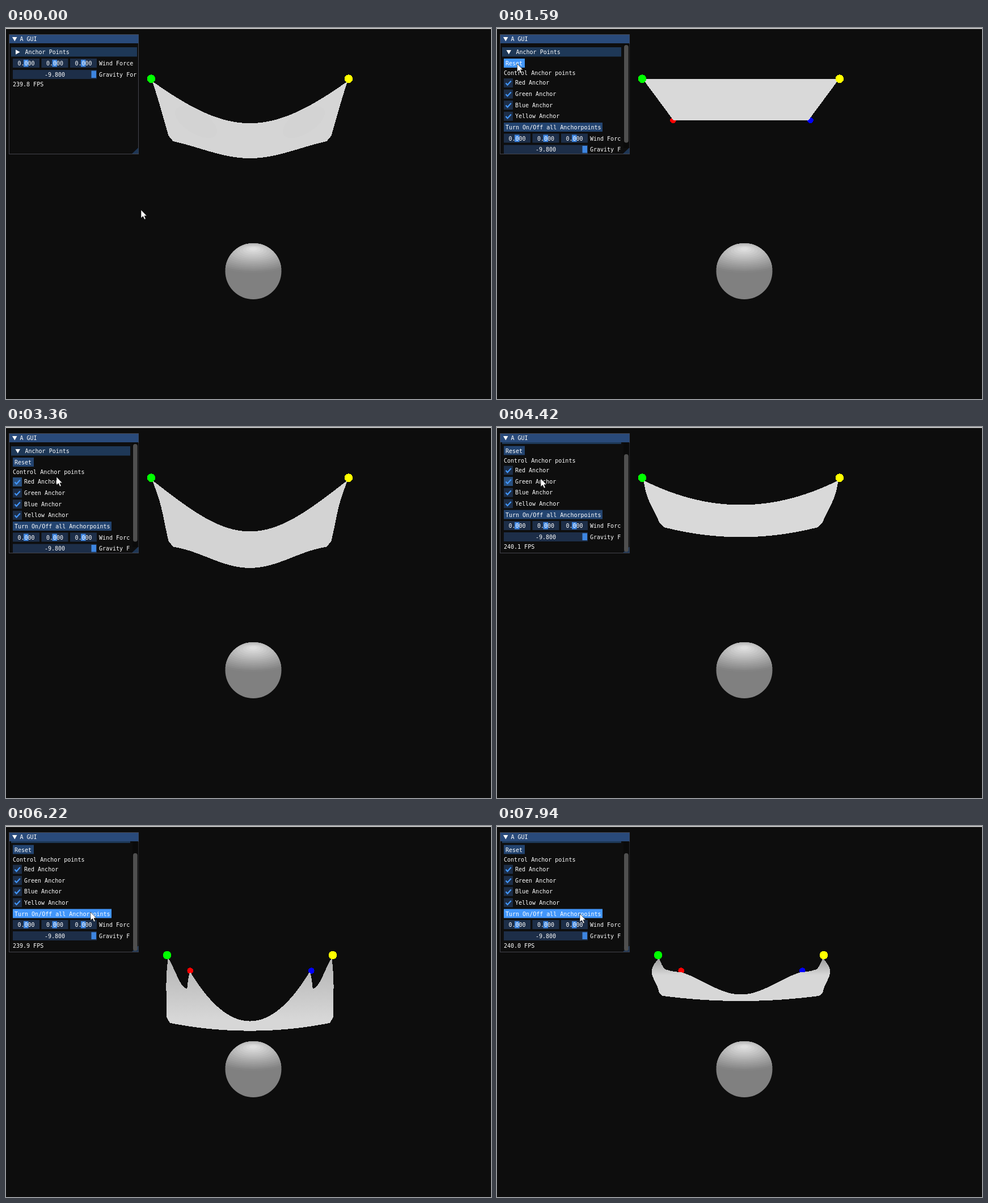
Write an HTML page that moves like this. It is 855 px wide and 655 px high and loops after 7.99 s.

```html
<!DOCTYPE html>
<html lang="en">
<head>
<meta charset="utf-8">
<title>Cloth</title>
<style>
  html, body { margin: 0; width: 100%; height: 100%; overflow: hidden; background: #0d0d0d; }
  svg { display: block; width: 855px; height: 655px; }
  text { font: 10px "DejaVu Sans Mono", "Liberation Mono", monospace; fill: #fff; white-space: pre; }
  .mid { text-anchor: middle; }
  .crisp { shape-rendering: crispEdges; }
  .frame { fill: #1d2e48; }
  .frame.hot { fill: #29507f; }
  .button { fill: #234470; }
  .button.hot { fill: #4296fa; }
  .header { fill: #1e3857; }
  .header.hot { fill: #387bcb; }
  .grab { fill: #3d85e0; }
  .tick { fill: none; stroke: #4296fa; stroke-width: 2.2; }
</style>
</head>
<body>
<svg viewBox="0 0 855 655">
  <defs>
    <linearGradient id="shade" gradientUnits="userSpaceOnUse" x1="0" x2="0">
      <stop id="shadeTop"/><stop id="shadeBase" offset="1"/>
    </linearGradient>
    <clipPath id="clothClip"><path id="clipShape"/></clipPath>
    <clipPath id="ballClip"><circle cx="436" cy="429.5" r="49.5"/></clipPath>
    <clipPath id="panelClip"><rect id="panelArea" x="9" y="27" height="195"/></clipPath>
  </defs>
  <rect width="855" height="655" fill="#0d0d0d"/>
  <rect width="855" height="1.5" fill="#f0f0f0"/>

  <g id="ball" clip-path="url(#ballClip)"><rect x="386" y="379" width="100" height="101" fill="#808080"/></g>
  <g class="crisp">
    <circle id="red" r="5.3" fill="#f00"/>
    <circle id="blue" r="5.3" fill="#00f"/>
    <path id="cloth" fill="url(#shade)"/>
  </g>
  <g clip-path="url(#clothClip)">
    <ellipse class="patch" rx="42" ry="20"/>
    <ellipse class="patch" rx="42" ry="20"/>
  </g>
  <g class="crisp">
    <circle id="green" r="7.3" fill="#0f0"/>
    <circle id="yellow" r="7.3" fill="#ff0"/>
  </g>

  <rect x="5.5" y="11.5" width="228" height="211" fill="#0e0e0e" stroke="#44444c"/>
  <rect x="6" y="12" width="227.5" height="15" fill="#294a7a"/>
  <path d="M11 16h8.5l-4.2 7.5z" fill="#fff"/>
  <text x="24.5" y="23.3">A GUI</text>
  <path d="M222 222L233.5 211V222Z" fill="#1e3655"/>

  <g clip-path="url(#panelClip)">
    <g id="content">
      <rect id="header" class="header" x="9" y="34" height="16.5"/>
      <path id="arrow" fill="#fff"/>
      <text x="33.5" y="46.3">Anchor Points</text>
      <g id="anchorMenu">
        <rect id="reset" class="button" x="12" y="54" width="37" height="16"/>
        <text x="15" y="66">Reset</text>
        <text x="12" y="83">Control Anchor points</text>
        <g id="checks"></g>
        <rect id="toggle" class="button" x="12" y="167" width="174" height="16"/>
        <text x="15" y="179">Turn On/Off all Anchorpoints</text>
      </g>
      <g id="tail">
        <g id="drags"></g>
        <text x="164" y="66">Wind Force</text>
        <rect class="frame" x="12" y="74" width="148" height="16"/>
        <rect class="grab" x="150.5" y="75.5" width="8.5" height="12.5"/>
        <text class="mid" x="86" y="85.5">-9.800</text>
        <text x="164" y="85.5">Gravity Force</text>
        <text id="fps" x="12" y="103"></text>
      </g>
    </g>
  </g>
  <g id="scrollbar">
    <rect x="223" y="28" width="10.5" height="184" fill="#0a0a0a"/>
    <rect id="thumb" x="224" width="7.7" height="172.5" rx="3.8" fill="#4f4f4f"/>
  </g>
  <path id="cursor" d="M0 0V14.5L3.5 11.5L6 17L8.3 16L6 10.7H10.3Z" fill="#fff" stroke="#000" stroke-width=".6"/>
</svg>
<script>
const LOOP = 7990, OPEN = 950, RESET = 1575, PEAK = 2883, SCROLL = 4250, RELEASE = 4940, CATCH = 5730;
const MIDDLE = 430;
const $ = id => document.getElementById(id);
const set = (el, attrs) => { for (const k in attrs) el.setAttribute(k, attrs[k]); return el; };
const add = (parent, tag, attrs, text = '') => {
  const el = set(document.createElementNS('http://www.w3.org/2000/svg', tag), attrs);
  el.textContent = text;
  return parent.appendChild(el);
};
const clamp = (v, lo = 0, hi = 1) => Math.max(lo, Math.min(hi, v));
const lerp = (a, b, k) => a + (b - a) * k;
const smooth = u => { u = clamp(u); return u * u * (3 - 2 * u); };
const span = (t, from, to) => clamp((t - from) / (to - from));
const grey = v => { const g = Math.round(v); return `rgb(${g},${g},${g})`; };

// Static parts
for (let i = 0; i < 14; i++) {
  const k = i / 13;
  add($('ball'), 'ellipse', { cx: 436, cy: 402 - 12 * k, rx: 80 - 73 * k, ry: 30 - 27 * k, fill: grey(131 + 92 * k) });
}
for (let i = 0; i < 3; i++) {
  const x = 12 + i * 50.5;
  add($('drags'), 'rect', { class: 'frame', x, y: 54, width: 47, height: 16 });
  add($('drags'), 'rect', { class: 'grab', x: x + 19, y: 56, width: 8.5, height: 12.5 });
  add($('drags'), 'text', { class: 'mid', x: x + 23.5, y: 66 }, '0.000');
}
const checks = ['Red', 'Green', 'Blue', 'Yellow'].map((name, i) => {
  const y = 89 + i * 19.6;
  const box = add($('checks'), 'rect', { class: 'frame', x: 12, y, width: 16, height: 16 });
  const tick = add($('checks'), 'path', { class: 'tick', d: `M15.5 ${y + 8.3}l3 3.3l6.3-7` });
  add($('checks'), 'text', { x: 32, y: y + 11.4 }, name + ' Anchor');
  return { box, tick, y };
});

// An edge that bends from a parabola (wave 0) to a cosine (wave 1)
function edge([x0, y0], [x1, y1], count, wave, start = 0) {
  return Array.from({ length: count }, (_, i) => {
    const u = lerp(start, 1, i / count);
    const bend = lerp(u * (2 - u), (1 - Math.cos(Math.PI * u)) / 2, wave);
    return [lerp(x0, x1, u), lerp(y0, y1, bend)];
  });
}

// Left half of the cloth, from the middle of the top round to the middle of the hem
function outline({ tip, mid, corner, low, bulge = 0, wave = 0, hem = 0, round = .08, notch, pin, notchWave }) {
  const top = notch
    ? [...edge(tip, notch, 8, notchWave), ...edge(notch, pin, 4, 0), ...edge(pin, [MIDDLE, mid], 20, wave)]
    : edge(tip, [MIDDLE, mid], 32, wave);
  const side = Array.from({ length: 14 }, (_, i) => {
    const v = (i + 1) / 14 * (1 - round);
    const swell = bulge * Math.sin(Math.PI * v ** .7) ** 2;
    return [lerp(tip[0], corner[0], v) + swell, lerp(tip[1], corner[1], v)];
  });
  return [[MIDDLE, mid], ...top.reverse(), ...side, ...edge(corner, [MIDDLE, low], 20, hem, round / 2), [MIDDLE, low]];
}
const blend = (a, b, k) => a.map((p, i) => [lerp(p[0], b[i][0], k), lerp(p[1], b[i][1], k)]);

const flat = outline({ tip: [257, 90], mid: 90, corner: [311, 163], low: 163, round: 0 });

// Hanging from two corners; the height of the hem decides everything else
function hang(low) {
  const k = (low - 195) / 54;
  return outline({
    tip: [258, 94], mid: 138 + 46.5 * k, corner: [289, 176 + 35 * k], low,
    bulge: clamp(7 * k - 4, -4, 3), wave: clamp(.25 * k), hem: clamp(.8 * k)
  });
}

function hemHeight(t) {
  if (t < RESET) return 230 - 8 * Math.sin(Math.PI * t / 1300);
  if (t < PEAK) return 163 + 123 * smooth(span(t, 1600, PEAK) ** 1.7);
  const s = (t - PEAK) / 1000;
  return 228 + 58 * Math.exp(-.24 * s) * Math.cos(2 * Math.PI * s / 2.6);
}

function anchors(t) {
  const v = span(t, RELEASE, CATCH);
  return {
    outer: [256 + 28 * smooth(2 * v), 89.7 + 138.3 * v ** 1.7],
    inner: [lerp(310.5, 324.7, v), lerp(163, 255.5, v)]
  };
}
const tipAt = t => { const [x, y] = anchors(t).outer; return [x + 1.5, y + 4]; };

function dropped(t) {
  const v = span(t, RELEASE, CATCH);
  return outline({
    tip: tipAt(t), mid: 174 + 50 * v, corner: [290, 202 + 70 * v ** 1.8],
    low: 236 + 37 * (1 - (1 - v) ** 3), bulge: -4 * smooth(2 * v),
    wave: .2 + .5 * v, hem: .65 + .2 * v
  });
}

// Bounce while four anchors hold: 0 is shallow, 1 is stretched
function bounce(t) {
  if (t < 6510) return lerp(-.69, 1.93, smooth(span(t, CATCH, 6510) ** 1.1));
  return lerp(1.93, -.1, smooth(span(t, 6510, 7620))) + .1 * smooth(span(t, 7620, 7940));
}

function pinned(t) {
  const b = bounce(t);
  return outline({
    tip: tipAt(t), notch: [Math.min(320, 300 + 19 * b), 254 + 33 * b], pin: [325, 258],
    mid: 297.5 + 46.5 * b, corner: [286 - 3 * b, 299 + 47 * b], low: 309 + 52 * b,
    bulge: Math.min(-2, 11 * b - 13), wave: clamp(.55 - .55 * b), notchWave: clamp(.5 * b)
  });
}

function clothShape(t) {
  if (t >= CATCH) return blend(dropped(CATCH), pinned(t), smooth(span(t, CATCH, CATCH + 400)));
  if (t >= RELEASE) return dropped(t);
  const swing = hang(hemHeight(t));
  return t < RESET ? swing : blend(flat, swing, smooth(span(t, 1600, 2200)));
}

const patches = document.querySelectorAll('.patch');

function drawCloth(t) {
  const half = clothShape(t);
  const whole = [...half, ...half.map(([x, y]) => [2 * MIDDLE - x, y]).reverse()];
  const d = 'M' + whole.map(p => p[0].toFixed(2) + ' ' + p[1].toFixed(2)).join('L') + 'Z';
  set($('cloth'), { d });
  set($('clipShape'), { d });

  const { outer, inner } = anchors(t), b = clamp(bounce(t));
  const held = smooth(span(t, CATCH, CATCH + 400));
  const base = t < RELEASE ? clamp(217 - (hemHeight(t) - 195) / 9, 211, 217) : lerp(211, 215, held);
  set($('shade'), { y1: outer[1] + 3, y2: outer[1] + 35 + 78 * b });
  set($('shadeTop'), { 'stop-color': grey(lerp(base, 150 + 28 * b, held)) });
  set($('shadeBase'), { 'stop-color': grey(base) });

  const falling = t >= RELEASE && t < CATCH;
  patches.forEach((el, i) => set(el, {
    transform: `translate(${MIDDLE + (i ? 95 : -95)} ${half[0][1] - 2}) rotate(${i ? -32 : 32})`,
    'fill-opacity': falling ? .025 : t < RESET ? .012 : 0
  }));
  set($('green'), { cx: outer[0], cy: outer[1] });
  set($('yellow'), { cx: 2 * MIDDLE - outer[0], cy: outer[1] });
  set($('red'), { cx: inner[0], cy: inner[1] });
  set($('blue'), { cx: 863 - inner[0], cy: inner[1] });
}

// Arrival time and place of each cursor move
const stops = [
  [800, 70, 44], [1350, 35.5, 63], [2400, 120, 112], [3340, 89, 88],
  [3800, 80, 44], [4250, 77, 91], [4880, 149, 152], [7000, 146, 155]
];
function cursorAt(t) {
  return stops.reduce(([x, y], [arrival, toX, toY]) => {
    const k = smooth(span(t, arrival - 430, arrival));
    return [lerp(x, toX, k), lerp(y, toY, k)];
  }, [238, 321]);
}
const rates = [[0, '239.8'], [SCROLL, '240.1'], [4700, '240.0'], [5800, '239.9'], [6900, '240.0']];

function drawPanel(t) {
  const open = t >= OPEN, scroll = t >= SCROLL ? 20.5 : 0;
  const on = t < RELEASE || t >= CATCH;
  const [cx, cy] = cursorAt(t);
  const heat = (el, x, y, w, h) => el.classList.toggle('hot',
    cx >= x && cx < x + w && cy + scroll >= y && cy + scroll < y + h && cy > 27);
  const width = open ? 210 : 222;

  set($('panelArea'), { width });
  set($('header'), { width });
  set($('content'), { transform: `translate(0 ${-scroll})` });
  set($('tail'), { transform: `translate(0 ${open ? 132.5 : 0})` });
  set($('arrow'), { d: open ? 'M16.5 39h8.5l-4.2 7.5z' : 'M17 38.3v8.4l7.7-4.2z' });
  set($('thumb'), { y: scroll ? 48 : 30 });
  $('anchorMenu').style.display = $('scrollbar').style.display = open ? '' : 'none';

  heat($('header'), 9, 34, width, 16.5);
  heat($('reset'), 12, 54, 37, 16.5);
  heat($('toggle'), 12, 167, 174, 16.5);
  for (const { box, tick, y } of checks) {
    heat(box, 12, y - 1.8, 97, 19.6);
    tick.style.display = on ? '' : 'none';
  }
  $('fps').textContent = rates.filter(([from]) => from <= t).pop()[1] + ' FPS';
  set($('cursor'), { transform: `translate(${cx} ${cy})` });
}

function frame(now) {
  const t = Math.max(0, now) % LOOP;
  drawCloth(t);
  drawPanel(t);
  requestAnimationFrame(frame);
}
frame(0);
</script>
</body>
</html>
```
